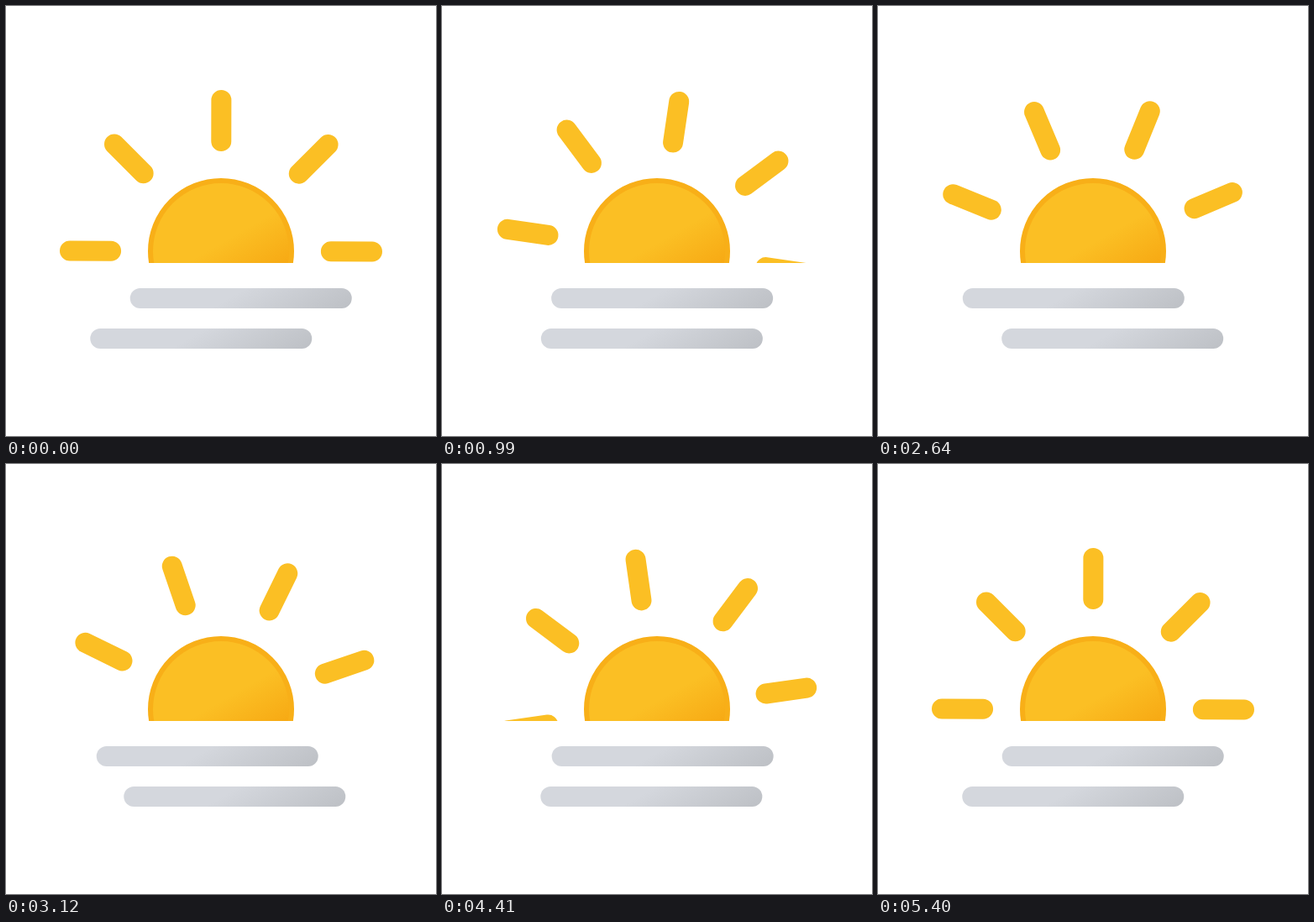
An HTML page with a canvas for the animation above (5430 ms loop, 512 by 512 pixels).

```html
<!DOCTYPE html>
<html lang="en">
<head>
<meta charset="utf-8">
<title>Sun over mist</title>
<style>
  html, body { margin: 0; width: 100%; height: 100%; overflow: hidden; background: #fff; }
  canvas { display: block; width: 512px; height: 512px; }
</style>
</head>
<body>
<canvas id="stage" width="512" height="512"></canvas>
<script>
const ctx = document.getElementById('stage').getContext('2d');
const LOOP = 5430, STEP = 30, CYCLE = 180;
const CX = 256, CY = 292, HORIZON = 306;

function ramp(x1, y1, x2, y2, light, dark) {
  const g = ctx.createLinearGradient(x1, y1, x2, y2);
  g.addColorStop(0, light);
  g.addColorStop(0.45, light);
  g.addColorStop(1, dark);
  return g;
}

const sunFill = ramp(-42, -72.8, 42, 72.8, '#fbbf24', '#f59e0b');
const mistFill = ramp(96, -50.4, 168, 74.4, '#d4d7dd', '#bec1c6');

function line(x1, y1, x2, y2, width, style) {
  ctx.lineWidth = width;
  ctx.lineCap = 'round';
  ctx.strokeStyle = style;
  ctx.beginPath();
  ctx.moveTo(x1, y1);
  ctx.lineTo(x2, y2);
  ctx.stroke();
}

function drawSun(turn) {
  ctx.save();
  ctx.beginPath();
  ctx.rect(0, 0, 512, HORIZON);
  ctx.clip();
  ctx.translate(CX, CY);

  ctx.beginPath();
  ctx.arc(0, 0, 84, 0, Math.PI * 2);
  ctx.fillStyle = sunFill;
  ctx.fill();
  ctx.lineWidth = 6;
  ctx.strokeStyle = '#f8af18';
  ctx.stroke();

  // Eight rays advance by one eighth of a turn per cycle.
  ctx.rotate(turn * Math.PI / 4);
  for (let i = 0; i < 8; i++) {
    line(0, -130.9, 0, -180, 24, '#fbbf24');
    ctx.rotate(Math.PI / 4);
  }
  ctx.restore();
}

function drawMist(x, y) {
  ctx.save();
  ctx.translate(x, y);
  line(12, 12, 252, 12, 24, mistFill);
  ctx.restore();
}

function draw(ms) {
  const tick = Math.floor((ms % LOOP) / STEP);
  const phase = ((tick + 0.5) % CYCLE) / CYCLE;
  const slide = 48 * (1 - Math.abs(1 - 2 * phase));

  ctx.fillStyle = '#fff';
  ctx.fillRect(0, 0, 512, 512);
  drawSun(phase);
  drawMist(148 - slide, 336);
  drawMist(100 + slide, 384);
}

let start = null;
function frame(now) {
  if (start === null) start = now;
  draw(Math.max(0, now - start));
  requestAnimationFrame(frame);
}
draw(0);
requestAnimationFrame(frame);
</script>
</body>
</html>
```
